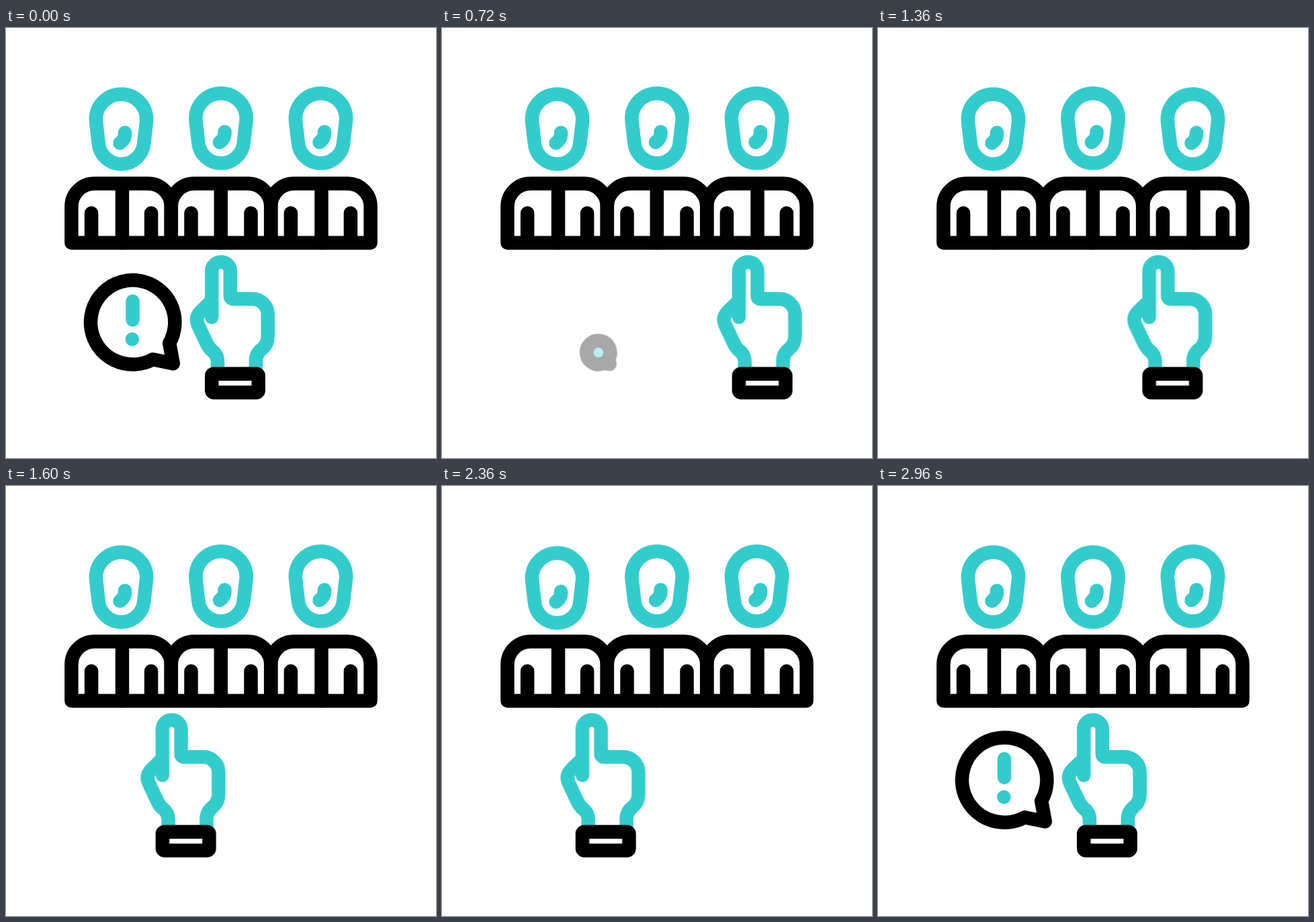
Recreate the animation shown at these times as an HTML page. Size 640x640 px, loop 3 s.

```html
<!DOCTYPE html>
<html lang="en">
<head>
<meta charset="utf-8">
<title>Choosing a candidate</title>
<style>
  @property --s { syntax: "<number>"; inherits: true; initial-value: 1; }

  html, body { margin: 0; width: 100%; height: 100%; overflow: hidden; background: #fff; }
  svg { display: block; width: 640px; height: 640px; }

  svg * {
    animation: 0s cubic-bezier(.3333, 0, .6667, 1) infinite;
  }
  path, rect { fill: none; stroke-linecap: round; stroke-linejoin: round; }
  svg { stroke: #000; stroke-width: 20.5px; }
  .teal { stroke: #3cc; }

  .head { animation-name: hop; animation-duration: 3s; }
  .right { animation-delay: -2.2s; }
  .left { animation-delay: -1.2s; }
  .mid { animation-delay: -.6s; }
  .hand { animation-name: point; animation-duration: 3s; }

  /* The bubble grows from its tail while the line weight stays constant. */
  .bubble {
    transform-origin: 250px 500.5px;
    transform: scale(var(--s));
    stroke-width: calc(20.5px / var(--s));
    animation-name: size, fade;
    animation-duration: 3s;
  }

  @keyframes hop {
    0%, 20%, 100% { transform: translateY(0); }
    6.6667% { transform: translateY(-26px); }
    13.3333% { transform: translateY(12px); }
  }
  @keyframes point {
    0%, 13.3333% { transform: translateX(0); }
    26.6667%, 40% { transform: translateX(151px); }
    60%, 73.3333% { transform: translateX(-151px); }
    86.6667%, 100% { transform: translateX(0); }
  }
  @keyframes size {
    0%, 6.6667% { --s: 1; }
    18.6667% { --s: 1.08; }
    26.6667%, 86.6667% { --s: .01; }
    93.3333% { --s: 1.08; }
    100% { --s: 1; }
  }
  @keyframes fade {
    0%, 20% { opacity: 1; }
    26.6667%, 86.6667% { opacity: 0; }
    93.3333%, 100% { opacity: 1; }
  }
</style>
</head>
<body>
<svg width="640" height="640">
  <defs>
    <g id="face">
      <path d="M-37.7 135A37.7 37.7 0 0 1 37.7 135L37.4 139 33.8 170A33.9 33.9 0 0 1 -33.8 170L-37.4 139Z"/>
      <path d="M5.5 154.5v3q0 7-7.5 12.5"/>
    </g>
    <path id="torso" d="M-74.2 319.8v-54a34.3 34.3 0 0 1 34.3-34.3h79.8a34.3 34.3 0 0 1 34.3 34.3v54zM-44.5 275.5v44M44.5 275.5v44"/>
  </defs>

  <g class="teal">
    <g class="head left"><use href="#face" x="171.5" y="1.2"/></g>
    <g class="head mid"><use href="#face" x="320"/></g>
    <g class="head right"><use href="#face" x="468.5"/></g>
  </g>

  <use href="#torso" x="171.6"/>
  <use href="#torso" x="320"/>
  <use href="#torso" x="468.4"/>
  <path d="M173 232v88M319.8 232v88M469.5 232v88"/>

  <g class="bubble">
    <path class="teal" d="M188.5 406.8v27.5M187.8 463.3h.01"/>
    <path d="M243.2 469A62.7 62.7 0 1 0 218.5 493.2L248.8 499.4Z"/>
  </g>

  <g class="hand">
    <g class="teal">
      <path d="M306.2 430.5V362a13.8 13.8 0 0 1 27.6 0V398.5q0 4.8 4.8 4.8H367a22.7 22.7 0 0 1 22.7 22.7V459c0 8-3 14-9 19-6 4.500-8.900 10-8.900 18V510"/>
      <path d="M305 407L290 421.500q-9.500 9.500-4 21L299 470q3 6 7 9.500c6 4.500 9 9.500 9 17.500V510"/>
    </g>
    <rect x="306.2" y="514.7" width="69.500" height="27.800" rx="3"/>
  </g>
</svg>
</body>
</html>
```
